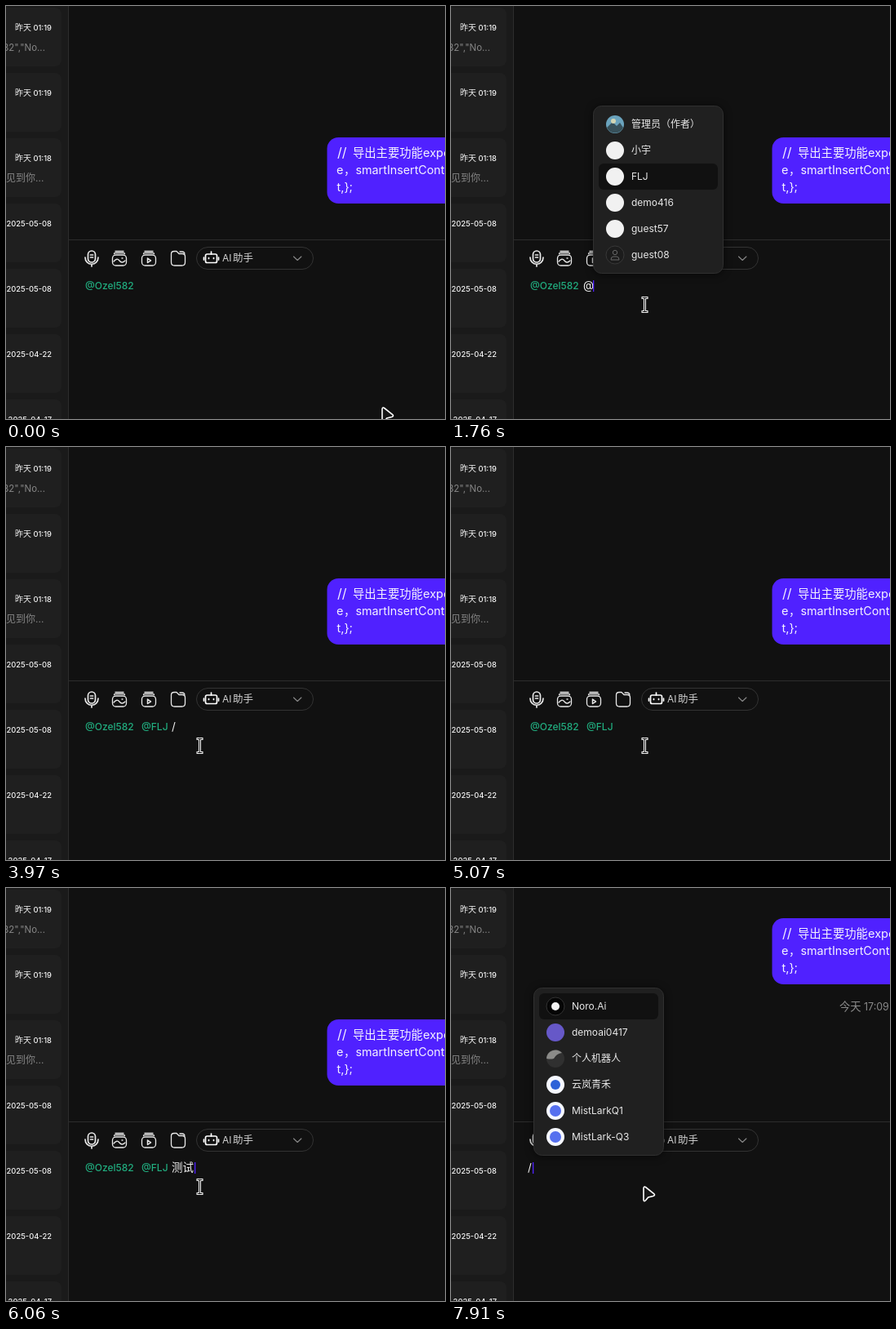
Recreate the animation shown at these times as an HTML page. Size 538 px wide and 506 px high, loop 8 s.

```html
<!DOCTYPE html>
<html lang="zh-CN">
<head>
<meta charset="utf-8">
<title>Chat mentions</title>
<style>
html, body { margin: 0; width: 100%; height: 100%; overflow: hidden; background: #111; }
svg { display: block; width: 538px; height: 506px; }
text { font-family: Inter, "Noto Sans CJK SC", "Noto Sans CJK", sans-serif; white-space: pre; }
.cjk { font-family: "Noto Sans CJK SC", "Noto Sans CJK", sans-serif; }
.line { fill: none; stroke: #e8e8e8; stroke-width: 1.3; stroke-linecap: round; stroke-linejoin: round; }
.mention { font-weight: 500; font-size: 12px; fill: #21ad7f; }
.panel { filter: drop-shadow(0 1px 5px #0009); }
</style>
</head>
<body>
<svg viewBox="0 0 538 506" xmlns="http://www.w3.org/2000/svg">
  <rect width="538" height="506" fill="#111"/>
  <g id="sidebar"><rect width="76" height="506" fill="#1a1a1a"/></g>
  <path d="M76.5 0V506M77 286.5H538" stroke="#2d2d2d"/>
  <g id="messages"></g>
  <g id="toolbar" class="line">
    <rect x="100.500" y="300" width="9" height="14" rx="4.500" stroke-width="1.7"/>
    <path d="M97 308c0 11 16 11 16 0M105 316.500v2.500M103.500 305h3M103.500 308h3" stroke-width="1.7"/>
    <g id="tray"><path d="M134 300.500h10M132.500 303.500q0-1 1.500-1h10q1.500 0 1.500 1"/><rect x="130.500" y="305" width="17" height="13" rx="4"/></g>
    <path d="M132 313q4-5 7-1t7 0M142 309h1"/>
    <use href="#tray" x="36"/>
    <path d="M173.500 309v5.500l4-2.700z" stroke-width="1.5"/>
    <path d="M202.500 304q0-3.500 3.500-3.500h3l3 3h4q3.500 0 3.500 3.500v7q0 4-4 4h-9q-4 0-4-4zM213 301h3q2 0 3 2"/>
    <rect x="233.500" y="295.500" width="143" height="27" rx="13.500" stroke="#333" stroke-width="1"/>
    <path d="M352.500 307l4.700 4.500 4.700-4.500" stroke="#888" stroke-width="1.100"/>
    <g stroke="#fff" stroke-width="1.700"><rect x="244.500" y="304" width="14" height="10.500" rx="2"/><path d="M251.500 301v3M242.500 308v3M260.500 308v3M248.500 308.500v1M254.500 308.500v1"/></g>
  </g>
  <g id="editor"></g>
  <g id="popup"></g>
  <g id="ime"></g>
  <g id="pointer"></g>
</svg>
<script>
const LOOP = 8000;
const PURPLE = '#5021ff';
const byId = id => document.getElementById(id);
const rect = (x, y, w, h, r, fill, more = '') =>
  `<rect x="${x}" y="${y}" width="${w}" height="${h}" rx="${r}" fill="${fill}" ${more}/>`;
const disc = (x, y, r, fill, more = '') => `<circle cx="${x}" cy="${y}" r="${r}" fill="${fill}" ${more}/>`;
const label = (x, y, size, fill, str, more = '') =>
  `<text x="${x}" y="${y}" font-size="${size}" fill="${fill}" ${more}>${str}</text>`;

const people = [
  ['管理员（作者）', 'scene'], ['小宇', 'plain'], ['FLJ', 'plain'],
  ['demo416', 'plain'], ['guest57', 'plain'], ['guest08', 'empty']
];
const bots = [
  ['Noro.Ai', 'black'], ['demoai0417', 'violet'], ['个人机器人', 'dusk'],
  ['云岚青禾', 'blue'], ['MistLarkQ1', 'indigo'], ['MistLark-Q3', 'indigo']
];

const avatars = {
  scene: (x, y) => disc(x, y, 11, '#6aa3bd') +
    `<path d="M${x - 10} ${y + 4}l7-7 5 5 4-4 4 6a11 11 0 0 1-20 0z" fill="#37505a"/>` + disc(x - 2, y - 4, 3, '#d3d6b4'),
  plain: (x, y) => disc(x, y, 11, '#f1f1f1'),
  empty: (x, y) => disc(x, y, 11, '#1c1c1c', 'stroke="#383838"') +
    `<g fill="none" stroke="#666"><circle cx="${x}" cy="${y - 3}" r="2.700"/><path d="M${x - 5} ${y + 6}q0-4 3-4h4q3 0 3 4z"/></g>`,
  black: (x, y) => disc(x, y, 11, '#050505', 'stroke="#333"') + disc(x, y, 5, '#f4f4f4'),
  violet: (x, y) => disc(x, y, 11, '#6658c8'),
  dusk: (x, y) => disc(x, y, 11, '#303030') +
    `<path d="M${x - 11} ${y}a11 11 0 0 1 19-7q-7 1-10 7-4 1-9 0z" fill="#8b8b89"/>`,
  blue: (x, y) => disc(x, y, 11, '#f6f8ff') + disc(x, y, 6, '#2d62d8'),
  indigo: (x, y) => disc(x, y, 11, '#f6f8ff') + disc(x, y, 7, '#5670ef')
};

function sidebar() {
  const dates = ['01:19', '01:19', '01:18', '2025-05-08', '2025-05-08', '2025-04-22', '2025-04-17'];
  const cards = dates.map((date, i) => {
    const y = 30 + 80 * i;
    return rect(-20, y - 28, 88, 72, 8, '#1f1f1f') +
      (date.length === 5 ? label(11, y, 10, '#f2f2f2', '昨天', 'class="cjk"') : '') +
      label(56, y, 9.4, '#f2f2f2', date, 'text-anchor="end" font-weight="500"');
  });
  return cards.join('') +
    label(48, 55, 11.5, '#858585', '582","No...', 'text-anchor="end"') +
    label(0, 215, 12, '#858585', '见到你...');
}

function messages(sent) {
  const y = sent ? 37 : 161, white = '#f5f3ff';
  return rect(393.5, y, 180, 81, 14, PURPLE) +
    label(406, y + 24, 16, white, '//') +
    label(425, y + 24, 14.3, white, '导出主要功能', 'class="cjk"') +
    label(511, y + 24, 14.5, white, 'export') +
    label(405, y + 45, 14.5, white, 'e') + label(414, y + 45, 14, white, '，', 'class="cjk"') +
    label(428.5, y + 45, 14.3, white, 'smartInsertContent') +
    label(405.5, y + 66, 14.5, white, 't,};') +
    (sent ? label(476, 150, 13.3, '#8a8a8a', '今天', 'class="cjk"') + label(506, 150, 12.4, '#8a8a8a', '17:09') : '');
}

function editor({ sent, picked, tail, caret, composing }) {
  const placeholder = sent && !tail;
  let out = '';
  if (placeholder) {
    out += label(93, 350, 14, '#787878', '输入', 'class="cjk"') + label(126, 350, 14, '#787878', '/') +
      label(138, 350, 14, '#787878', '唤起', 'class="cjk"') + label(166, 350, 13, '#787878', 'AI') +
      label(178, 350, 14, '#787878', '助手', 'class="cjk"');
  }
  if (!sent) out += label(97, 347, 12, '', '@Ozel582', 'class="mention"');
  if (picked) out += label(166, 347, 12, '', '@FLJ', 'class="mention"');
  if (tail) out += label(tail[0], 347, 13.5, '#f2f2f2', tail[1]);
  if (composing) out += `<path d="M203 349.500H${caret}" stroke="#ddd" stroke-dasharray="1 1"/>`;
  if (caret) {
    out += rect(caret, placeholder ? 337 : 336, 1.3, 14, 0, composing || placeholder ? '#8b8b93' : PURPLE);
  }
  return out;
}

function popup({ list, left, selected }) {
  if (!list) return '';
  const rows = list.map(([name, kind], i) => {
    const y = 145 + 32 * i;
    return (i === selected ? rect(left + 7, y - 16, 146, 32, 6, '#111') : '') +
      avatars[kind](left + 27, y) + label(left + 47, y + 4.3, 12, '#e8e8e8', name);
  });
  return `<g class="panel">${rect(left + .5, 122.5, 159, 205, 10, '#202020', 'stroke="#303030"')}</g>` + rows.join('');
}

function ime(words) {
  if (!words) return '';
  const step = words[0].length * 18 + 43;
  return rect(203, 350, 340, 45, 0, '#d2d2d2') + rect(203, 350, step, 45, 0, '#b4b4b4') +
    words.map((word, i) => label(216 + step * i, 379, 19, '#5c5c5c', i + 1, 'class="cjk"') +
      label(235 + step * i, 379, 19, '#111', word, 'class="cjk"')).join('');
}

const cursors = {
  arrow: '<path d="M0 2V16q.5 3 2.700.5l3-3.500 6-1.500q3-1 1-3L2.500.5Q.2-1 0 2z" fill="#161616" stroke="#fff" stroke-width="1.600"/>',
  beam: '<path d="M-4-8.500H-1L0-8l1-.5H4M-4 8.500H-1L0 8l1 .5H4M0-8V8" fill="none" stroke="#fff" stroke-width="3"/><path d="M-3-8.500H3M-3 8.500H3M0-8.500V8.500" stroke="#111"/>',
  solid: '<path d="M0 0V18l4.500-4 3.500 7 4-2-3.500-6.500H14z" fill="#050505" stroke="#fff" stroke-width="1.300"/>'
};
const pointer = ([kind, x, y]) => `<g transform="translate(${x} ${y})">${cursors[kind]}</g>`;

// Each step changes only the listed parts of the previous one.
const steps = [
  [0, { pointer: ['arrow', 461, 492] }],
  [280, { pointer: ['arrow', 345, 428] }],
  [470, { pointer: ['beam', 237.5, 366], caret: 161 }],
  [840, { tail: [162, '@'], caret: 174, list: people, left: 174, selected: 0 }],
  [1380, { caret: 0 }],
  [1570, { selected: 1 }],
  [1760, { selected: 2, caret: 174 }],
  [2320, { list: null, tail: null, picked: true, caret: 203 }],
  [2880, { caret: 0 }],
  [3430, { tail: [203, '/'], caret: 210 }],
  [3970, { caret: 0 }],
  [4340, { tail: null }],
  [4520, { caret: 203 }],
  [5070, { caret: 0 }],
  [5680, { tail: [203, 'c'], caret: 211, composing: true, words: [...'测册策侧厕曾'], pointer: ['solid', 237, 363] }],
  [5880, { tail: [203, "c's"], caret: 221, words: ['测试', '从事', '城市', '成熟', '尝试'] }],
  [6060, { tail: [203, '测试'], caret: 231, composing: false, words: null, pointer: ['beam', 237.5, 366] }],
  [6260, { sent: true, picked: false, tail: null, caret: 93, pointer: ['arrow', 236, 366] }],
  [6620, { caret: 0 }],
  [7180, { caret: 93 }],
  [7540, { caret: 0 }],
  [7910, { tail: [94, '/'], caret: 100, list: bots, left: 101, selected: 0 }]
];
const states = [];
steps.forEach(([, change], i) => states.push({ ...states[i - 1], ...change }));

let shown = -1;
function render(time) {
  const index = steps.findLastIndex(([start]) => start <= time);
  if (index === shown) return;
  shown = index;
  const state = states[index];
  byId('messages').innerHTML = messages(state.sent);
  byId('editor').innerHTML = editor(state);
  byId('popup').innerHTML = popup(state);
  byId('ime').innerHTML = ime(state.words);
  byId('pointer').innerHTML = pointer(state.pointer);
}

byId('sidebar').innerHTML += sidebar();
byId('toolbar').insertAdjacentHTML('afterend',
  label(265, 313, 12, '#d0d0d0', 'AI') + label(278, 313, 12.5, '#d0d0d0', '助手', 'class="cjk"'));

const start = performance.now();
function tick() {
  render((performance.now() - start) % LOOP);
  requestAnimationFrame(tick);
}
tick();
</script>
</body>
</html>
```
